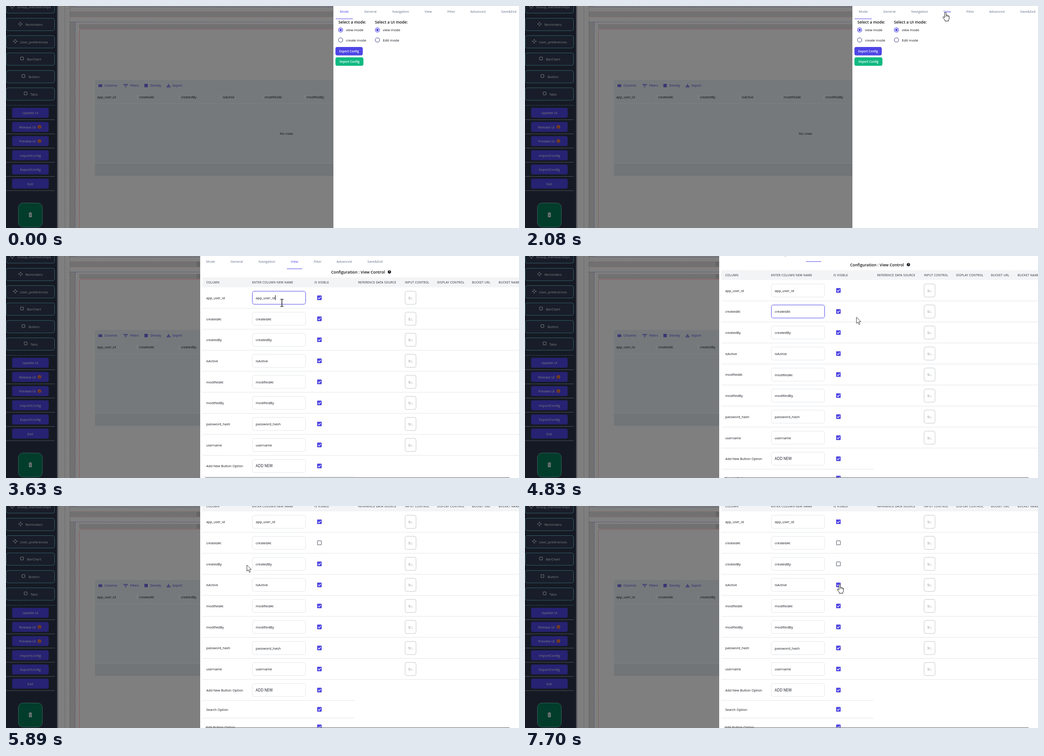
Recreate the animation shown at these times as an HTML page. Size 1136x493 px, loop 8 s.

```html
<!DOCTYPE html>
<html lang="en">
<head>
<meta charset="utf-8">
<title>View configuration</title>
<style>
  html, body { margin: 0; width: 100%; height: 100%; overflow: hidden; background: #7f7f7f; }
  svg { display: block; width: 1136px; height: 493px; font-family: "Open Sans", "Noto Sans", sans-serif; }
  text { white-space: pre; }
</style>
</head>
<body>
<svg id="stage" viewBox="0 0 1136 493" xmlns="http://www.w3.org/2000/svg"></svg>
<script>
const INDIGO = '#4f46e5', SLATE = '#64748b', INK = '#14171f';
const DIM_INDIGO = '#272272', DIM_WHITE = '#7f7f7f', DIM_GREEN = '#023c2b';
const LOOP = 8000, OPEN = 2280, ROW = 46.7;

const rect = (x, y, w, h, fill, extra = '') =>
  `<rect x="${x}" y="${y}" width="${w}" height="${h}" fill="${fill}" ${extra}/>`;
const box = (x, y, w, h, r, fill, stroke, extra = '') =>
  rect(x, y, w, h, fill, `rx="${r}" stroke="${stroke}" ${extra}`);
const path = (d, stroke, extra = '') => `<path d="${d}" fill="none" stroke="${stroke}" ${extra}/>`;
const circle = (x, y, r, fill, extra = '') => `<circle cx="${x}" cy="${y}" r="${r}" fill="${fill}" ${extra}/>`;
const text = (x, cy, s, size, fill, extra = '') =>
  `<text x="${x}" y="${cy + size * 0.36}" font-size="${size}" fill="${fill}" ${extra}>${s}</text>`;
const MID = 'text-anchor="middle"', BOLD = 'font-weight="600"', MEDIUM = 'font-weight="500"';
const dash = 'stroke-dasharray="2 2"';

function sidebar() {
  let out = rect(0, 0, 113.5, 493, '#151923') + rect(113.5, 0, 2.5, 493, '#5c5e62');
  const cards = [['Group_memberships', 14, 2], ['Reminders', 32, 41], ['User_preferences', 20.5, 79.5],
    ['BarChart', 35.5, 118], ['Button', 38.5, 157], ['Tabs', 43.5, 195.5]];
  cards.forEach(([label, ix, y], i) => {
    out += box(0.5, y - 13.8, 107, 27.6, 4, '#181d29', '#34626a');
    out += text(62, y + 0.5, label, 7.6, DIM_WHITE, MID);
    out += i < 3
      ? `<g transform="translate(${ix} ${y - 1})">` +
        path('M-1.5 -3L0 -4.5L1.5 -3M-1.5 3L0 4.5L1.5 3M-3 -1.5L-4.5 0L-3 1.5M3 -1.5L4.5 0L3 1.5M0 -4V-1.4M0 4V1.4M-4 0H-1.4M4 0H1.4', DIM_WHITE) + '</g>'
      : box(ix - 3.2, y - 4.6, 6.4, 6.4, 0.6, 'none', DIM_WHITE);
  });
  out += path('M0 220.5H109', '#3f6a72', dash);
  ['Update UI', 'Release UI', 'Preview UI', 'ImportConfig', 'ExportConfig', 'Exit'].forEach((label, i) => {
    const y = 237 + i * 31.5, face = i === 1 || i === 2;
    out += rect(13.5, y - 11, 81, 22, DIM_INDIGO, 'rx="4"');
    out += text(face ? 47.5 : 54, y + 0.5, label, 7.6, DIM_WHITE, MID);
    if (face) out += circle(74, y, 4, '#7c4020') + circle(74, y + 1.6, 1.2, '#4d2018') +
      circle(72.5, y - 1, 0.6, '#3a1c14') + circle(75.5, y - 1, 0.6, '#3a1c14');
    out += path(`M0 ${y + 15.5}H108`, '#4f5157');
  });
  out += box(27.5, 437.5, 53, 53.5, 10, DIM_GREEN, '#34625a');
  out += path('M50 460.5H58M52.5 460V458.8H55.5V460', DIM_WHITE, 'stroke-width="1.2"');
  return out + rect(50.8, 461.5, 6.4, 7.5, DIM_WHITE, 'rx="1"') +
    path('M53 463V467.3M55 463V467.3', DIM_GREEN, 'stroke-width=".8"');
}

function canvasArea() {
  const strip = '#717171', blue = '#45477a', red = '#8a5a5e';
  let out = rect(116, 0, 1020, 493, '#7f7f7f');
  out += rect(141, 0, 12, 3, strip) + rect(141, 12.5, 600, 11.5, strip) +
    rect(141, 35.5, 12, 458, strip) + rect(162, 40, 600, 10.5, strip);
  out += path('M153 2.5H740M141 35.5H740M153.5 36V493', blue, dash);
  out += path('M141.5 0V493M130.5 0V493', '#55575c', dash);
  out += path('M141 12.5H740M141 24.5H740', red, 'stroke-dasharray="1 1"');
  out += path('M740 51.5H168Q162.5 51.5 162.5 57V493', red);

  out += rect(197, 164, 560, 213, '#75797b', 'rx="4"') + rect(197, 350, 560, 27, '#717577', 'rx="3"');
  out += path('M197 217H740M197 349.5H740', '#7f8284');
  [['Columns', 218], ['Filters', 275], ['Density', 319.5], ['Export', 369]].forEach(([s, x]) =>
    out += text(x, 177, s, 6.9, DIM_INDIGO, MEDIUM));
  out += path('M206.2 174V180M209 174V180M211.8 174V180', DIM_INDIGO, 'stroke-width="2"');
  out += path('M260 174.3H270M262 177H268M264 179.7H266', DIM_INDIGO, 'stroke-width="1.2"');
  out += path('M306.5 174.2H314M306.5 176.8H314M306.5 179.4H314', DIM_INDIGO, 'stroke-width="1.9"');
  out += path('M356.7 177V180H363.3V177M360 173V178M358 176.3L360 178.3L362 176.3', DIM_INDIGO, 'stroke-width="1.1"');
  ['app_user_id', 'createdAt', 'createdBy', 'isActive', 'modifiedAt', 'modifiedBy'].forEach((s, i) => {
    out += text(202 + i * 92.7, 202, s, 7.35, '#101214');
    if (i) out += path(`M${197.5 + i * 92.7} 197V207`, '#858889');
  });
  return out + text(621, 283.3, 'No rows', 7.7, '#101214', MID);
}

function tabs() {
  const labels = [['Mode', 453], ['General', 511], ['Navigation', 578], ['View', 639], ['Filter', 690],
    ['Advanced', 749], ['Save&amp;Exit', 817.5]];
  return '<g id="tabs">' + labels.map(([s, x]) =>
    text(x, 12.3, s, 7.5, SLATE, `${MID} id="tab${s.slice(0, 4)}"`)).join('') +
    rect(434, 28, 38, 1, INDIGO, 'id="underline"') + '</g>';
}

function modePane() {
  const radio = (x, y, label, on) =>
    circle(x, y, 4.8, '#fff', `stroke="${on ? INDIGO : '#6468a0'}" stroke-width="1.2"`) +
    (on ? circle(x, y, 2.6, INDIGO) : '') + text(x + 12, y + 0.5, label, 7.65, INK);
  const button = (y, w, label, fill) => rect(729.5, y, w, 18.7, fill, 'rx="4"') +
    text(729.5 + w / 2, y + 9.8, label, 6.7, '#fff', `${MID} ${BOLD}`);
  return '<g id="modePane">' +
    text(736, 36, 'Select a mode:', 8.75, '#111', BOLD) + text(817, 36, 'Select a UI mode:', 8.75, '#111', BOLD) +
    radio(741, 53.2, 'view mode', true) + radio(741, 75.5, 'create mode', false) +
    radio(822.5, 53.2, 'view mode', true) + radio(822.5, 75.5, 'Edit mode', false) +
    button(91, 60.5, 'Export Config', INDIGO) + button(114, 62, 'Import Config', '#10b981') + '</g>';
}

function viewPane() {
  let out = text(720, 36, 'Configuration : View Control', 8.8, '#111', BOLD);
  out += circle(849, 35.3, 3.6, '#16181d') + text(849, 35.3, '?', 5.6, '#fff', `${MID} font-weight="700"`);
  out += rect(435, 47.5, 701, 22, '#f3f4f6');
  [['COLUMN', 443.5], ['ENTER COLUMN NEW NAME', 545], ['IS VISIBLE', 683], ['REFERENCE DATA SOURCE', 780],
    ['INPUT CONTROL', 883.5], ['DISPLAY CONTROL', 955], ['BUCKET URL', 1032], ['BUCKET NAME', 1091]]
    .forEach(([s, x]) => out += text(x, 58.6, s, 6.4, '#1f2430', `${MEDIUM} letter-spacing=".32"`));

  const check = (id, y) => `<g id="check${id}">` +
    box(689.6, y - 4.4, 8.8, 8.8, 1, '#fff', '#666b78', 'stroke-width="1.2"') +
    `<g class="tick">${rect(689, y - 5, 10, 10, INDIGO, 'rx="1.2"')}` +
    path(`M691 ${y}L693.2 ${y + 2.2}L697.2 ${y - 2}`, '#fff', 'stroke-width="1.3"') + '</g></g>';
  const names = ['app_user_id', 'createdAt', 'createdBy', 'isActive', 'modifiedAt', 'modifiedBy',
    'password_hash', 'username', 'Add New Button Option'];
  names.forEach((name, i) => {
    const y = 92.7 + i * ROW, last = i === 8;
    out += text(443.5, y + 0.5, name, 7.35, INK);
    out += box(545.5, y - 14.5, 118, 29, 4.5, '#fff', '#e3e5e9', `id="field${i}"`);
    out += (last ? text(553, y + 0.2, 'ADD NEW', 8.2, INK) : text(553, y + 0.5, name, 7.65, INK)) + check(i, y);
    if (!last) out += box(883.8, y - 14.6, 24.2, 29.2, 4, '#fff', '#c4c6ca') + text(891, y + 0.3, 'S::.', 7.9, '#6d727c');
    out += path(`M435 ${y + 23.2}H${last ? 772 : 1136}`, '#e3e5e9');
  });
  ['Search Option', 'Edit Button Option'].forEach((name, i) => {
    const y = 509.2 + i * 39;
    out += text(443.5, y + 0.5, name, 7.35, INK) + check(9 + i, y) + path(`M435 ${y + 19.5}H772`, '#e3e5e9');
  });
  return `<g id="viewPane">${out}${path('M596.5 87V98', '#111', 'id="caret"')}` +
    `${path('M442.5 6.5V18', '#111', 'id="tabCaret"')}</g>`;
}

function cursors() {
  const hand = 'M-1.6 10V1.4Q-1.6 0 0 0T1.6 1.4V6.4Q3 5.6 4.2 7Q5.6 6.3 6.5 7.7Q8.3 7.3 8.3 9.2V13Q8.3 15.5 6.8 17.2V19.4H-1V17.4L-5.4 11.8Q-6.2 10.4 -5 9.8Q-4 9.4 -3 10.6L-1.6 12Z';
  const arrow = 'M0 0V13.6L3.1 10.8L5.4 16.2L7.7 15.2L5.4 10H9.8Z';
  return '<g id="cursor">' +
    `<g id="hand"><path d="${hand}" fill="#fff" stroke="#111" stroke-linejoin="round"/>` +
    path('M1.6 6.4V10M4.2 7V10M6.5 8V10.4', '#111', 'stroke-width=".8"') + '</g>' +
    `<path id="arrow" d="${arrow}" fill="#fff" stroke="#222" stroke-width=".9"/>` +
    path('M-3.5 -8H-1L0 -7.4L1 -8H3.5M0 -7.4V7.4M-3.5 8H-1L0 7.4L1 8H3.5', '#111', 'id="beam" stroke-width="1.4"') + '</g>';
}

document.getElementById('stage').innerHTML = canvasArea() + sidebar() +
  `<g id="edge">${rect(422, 12.5, 8, 11.5, '#666')}${rect(422, 40, 8, 10.5, '#666')}</g>` +
  rect(725, 0, 711, 493, '#fff', 'id="panel"') +
  `<g id="scroller">${tabs()}${modePane()}${viewPane()}</g>` +
  rect(441, 491.6, 674, 1.4, '#8b8b8b', 'id="scrollbar"') + cursors();

// time, x, y, pointer kind
const pointerKeys = [
  [70, 737, 46, 'hand'], [200, 741, 70, 'hand'], [610, 741, 69, 'hand'], [750, 790, 62, 'arrow'],
  [920, 915, 36, 'arrow'], [1060, 974, 20, 'hand'], [1230, 985, 16, 'hand'], [1470, 981, 14, 'hand'],
  [1750, 931, 14, 'hand'], [2280, 931, 14, 'arrow'], [2420, 931, 14, 'arrow'], [2760, 800, 42, 'arrow'],
  [3010, 645, 82, 'beam'], [3250, 618, 96, 'beam'], [3630, 611, 104, 'beam'], [3840, 611, 130, 'beam'],
  [4060, 612, 140, 'beam'], [4350, 640, 138, 'beam'], [4460, 668, 134, 'arrow'], [4700, 734, 136, 'arrow'],
  [5130, 734, 136, 'arrow'], [5350, 700, 92, 'hand'], [5450, 697, 87, 'hand'], [5690, 697, 87, 'hand'],
  [5750, 664, 105, 'beam'], [5860, 545, 130, 'arrow'], [5890, 534, 131, 'arrow'], [6030, 462, 136, 'arrow'],
  [6170, 546, 133, 'beam'], [6310, 640, 131, 'beam'], [6360, 672, 130, 'arrow'], [6440, 696, 128, 'hand'],
  [6840, 696, 128, 'hand'], [7130, 697, 146, 'arrow'], [7380, 698, 164, 'hand'], [7630, 697, 173, 'hand'],
  [7700, 697, 174.5, 'hand']];
const scrollKeys = [[4770, 0], [4830, 16], [5100, 57.6]];
const focusSpans = [[3400, 3920, 0], [4060, 5480, 1], [6240, 6510, 2]];

const el = id => document.getElementById(id);
const show = (id, on) => el(id).setAttribute('display', on ? 'inline' : 'none');
const within = (t, a, b) => t >= a && t < b;
const clamp01 = v => Math.min(1, Math.max(0, v));

function sample(keys, t) {
  let i = 0;
  while (i < keys.length - 1 && keys[i + 1][0] <= t) i++;
  const a = keys[i], b = keys[i + 1] || a;
  const k = b === a ? 0 : clamp01((t - a[0]) / (b[0] - a[0]));
  return { values: a.slice(1, 3).map((v, n) => v + (b[n + 1] - v) * k), kind: a[3] };
}

function draw(t) {
  const wide = t >= OPEN, picked = t >= 1950;
  el('panel').setAttribute('x', wide ? 430 : 725);
  show('modePane', !wide);
  ['viewPane', 'scrollbar', 'edge'].forEach(id => show(id, wide));
  el('tabs').setAttribute('transform', `translate(${wide ? 0 : 296} 0)`);
  el('tabMode').setAttribute('fill', picked ? SLATE : INDIGO);
  el('tabView').setAttribute('fill', picked ? INDIGO : SLATE);
  const s = clamp01((t - OPEN) / 265), slide = s * s * (3 - 2 * s);
  el('underline').setAttribute('x', 434 + 188 * slide);
  el('underline').setAttribute('width', 38 - 4 * slide);
  el('scroller').setAttribute('transform', `translate(0 ${-sample(scrollKeys, t).values[0]})`);

  for (const [a, b, row] of focusSpans)
    el('field' + row).setAttribute('stroke', within(t, a, b) ? INDIGO : '#e3e5e9');
  el('check1').querySelector('.tick').setAttribute('opacity', t < 5480 ? 1 : 0);
  el('check2').querySelector('.tick').setAttribute('opacity', t < 6510 ? 1 : 0);
  show('caret', within(t, 3400, 3900));
  show('tabCaret', within(t, OPEN, 2760) || within(t, 3200, 3400));

  const { values: [x, y], kind } = sample(pointerKeys, t);
  show('cursor', t >= 70);
  el('cursor').setAttribute('transform', `translate(${x} ${y})`);
  ['hand', 'arrow', 'beam'].forEach(id => show(id, id === kind));
}

const start = performance.now();
function tick() {
  draw((performance.now() - start) % LOOP);
  requestAnimationFrame(tick);
}
tick();
</script>
</body>
</html>
```
